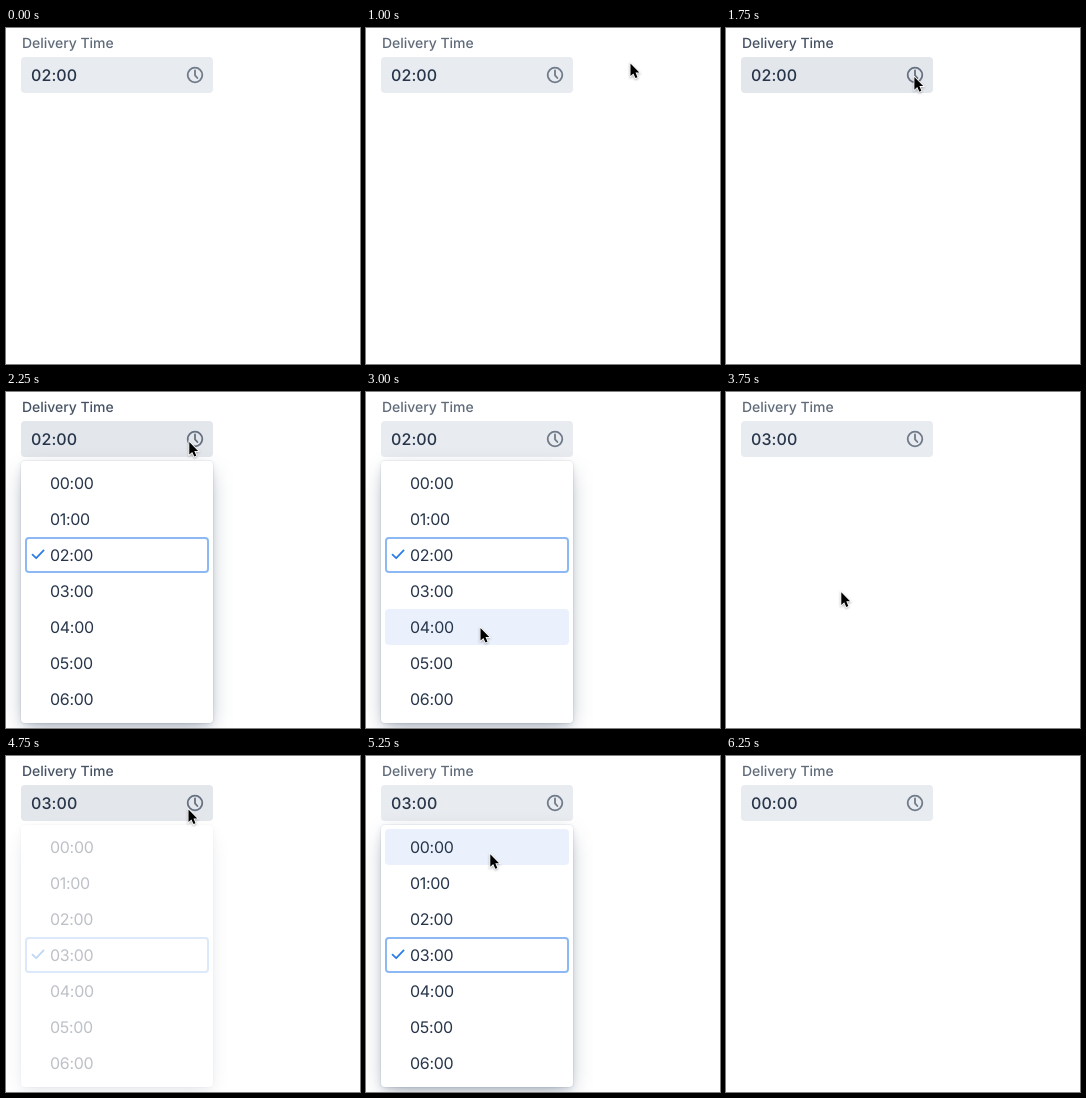
Write an HTML page that moves like this. It is 354 px wide and 336 px high and loops after 7.25 s.

```html
<!DOCTYPE html>
<html lang="en">
<head>
<meta charset="utf-8">
<title>Time picker</title>
<style>
  html, body { margin: 0; width: 100%; height: 100%; overflow: hidden; background: #fff; }
  svg { display: block; width: 100%; height: 100%; font-family: Inter, sans-serif; }
  text { font-size: 16px; fill: #26354a; text-rendering: geometricPrecision; }
  #label { font-size: 14px; font-weight: 500; letter-spacing: -.04px; fill: #606b7a; }
  #value { font-weight: 500; letter-spacing: .1px; }
  #rows text { letter-spacing: -.3px; }
  #field { fill: #e8ebef; }
  #clock { stroke: #707b8a; }
  .active #label { fill: #465264; }
  .active #field { fill: #e3e6eb; }
  .active #clock { stroke: #667182; }
  .near { fill: rgba(28, 53, 90, .16); filter: blur(3px); }
  .far { fill: rgba(28, 49, 79, .36); filter: blur(11px); }
  #cursor { filter: drop-shadow(0 1px 1px rgba(0, 0, 0, .3)); }
</style>
</head>
<body>
<svg id="stage" viewBox="0 0 354 336">
  <text id="label" x="16" y="20">Delivery Time</text>
  <rect id="field" x="15" y="29" width="192" height="36" rx="4"/>
  <text id="value" x="25" y="53"></text>
  <g id="clock" fill="none" stroke-width="1.8" stroke-linecap="round" stroke-linejoin="round">
    <circle cx="189" cy="47" r="7.3"/>
    <path d="M189 42.3V47.3L191.4 50"/>
  </g>
  <g id="list">
    <rect class="far" x="19" y="81" width="184" height="254" rx="4"/>
    <rect class="near" x="16" y="72" width="190" height="260" rx="4"/>
    <rect x="14" y="68" width="194" height="264" rx="5" fill="#193767" fill-opacity=".05"/>
    <rect x="15" y="69" width="192" height="262" rx="4" fill="#fff"/>
    <rect id="hover" x="19" width="184" height="36" rx="4" fill="#eaf1fd"/>
    <g id="selected" fill="none" stroke-width="2">
      <rect x="20" y="1" width="182" height="34" rx="3" stroke="#8cb9f3"/>
      <path d="M26.5 17.6L30.2 21.2L37.6 13.4" stroke="#2b7de6" stroke-width="1.8"
        stroke-linecap="round" stroke-linejoin="round"/>
    </g>
    <g id="rows"></g>
  </g>
  <path id="cursor" d="M0 0V12.6L2.9 9.9L5 14.6L7 13.7L5 9H8.8Z"
    stroke="#fff" stroke-width="1.6" paint-order="stroke"/>
</svg>
<script>
// Time advances in steps of 250 ms; all times below are in steps.
const STEP = 250, STEPS = 29, ROW = 36, TOP = 73, ROWS = 7;
const SHOWN = 2, HIDDEN = 25;
const visits = [{ open: 8.5, pick: 15 }, { open: 18.85, pick: 23 }];
const home = [294, 18.5];
const moves = [
  { from: 2, to: 4, end: [264.5, 35.5] },
  { from: 5, to: 9, end: [183.3, 50] },
  { from: 10, to: 11, end: [173.5, 93.5] },
  { from: 11, to: 12, end: [114.5, 236] },
  { from: 12, to: 13, end: [115.3, 200.3] },
  { from: 16, to: 18, end: [182.5, 53.5] },
  { from: 19, to: 20, end: [124.3, 98.2] }
];

const $ = id => document.getElementById(id);
const set = (id, name, value) => $(id).setAttribute(name, value);
const show = (id, on) => set(id, 'visibility', on ? 'visible' : 'hidden');
const clamp = v => Math.min(1, Math.max(0, v));
const easeOut = p => 1 - (1 - p) ** 4;
const hour = n => `0${n}:00`;

function cursorAt(k) {
  return moves.reduce((pos, { from, to, end }) => {
    const p = easeOut(clamp((k - from) / (to - from)));
    return pos.map((v, i) => v + (end[i] - v) * p);
  }, home);
}

const rowAt = k => Math.floor((cursorAt(k)[1] - TOP) / ROW);

function overField(k) {
  const [x, y] = cursorAt(k);
  return x > 15 && x < 207 && y > 29 && y < 65;
}

for (let i = 0; i < ROWS; i++) {
  const row = document.createElementNS('http://www.w3.org/2000/svg', 'text');
  row.setAttribute('x', 44);
  row.setAttribute('y', TOP + ROW * i + 24);
  row.textContent = hour(i);
  $('rows').append(row);
}

function draw(k) {
  const picked = visits.findLast(v => v.pick <= k);
  const value = picked ? rowAt(picked.pick) : 2;
  const visit = visits.find(v => v.open <= k && k < v.pick);
  const age = visit ? k - visit.open : 0;

  $('stage').classList.toggle('active', overField(k) && age < 1);
  $('value').textContent = hour(value);

  set('list', 'opacity', clamp(age * 2));
  set('selected', 'transform', `translate(0 ${TOP + ROW * value})`);

  // A row lights up one step after the cursor has entered the list.
  set('hover', 'y', TOP + ROW * rowAt(k));
  show('hover', visit && rowAt(k) >= 0 && rowAt(k - 1) >= 0);

  set('cursor', 'transform', `translate(${cursorAt(k)})`);
  show('cursor', k >= SHOWN && k < HIDDEN);
}

const start = performance.now();
function tick() {
  draw(Math.floor((performance.now() - start) / STEP) % STEPS);
  requestAnimationFrame(tick);
}
tick();
</script>
</body>
</html>
```
